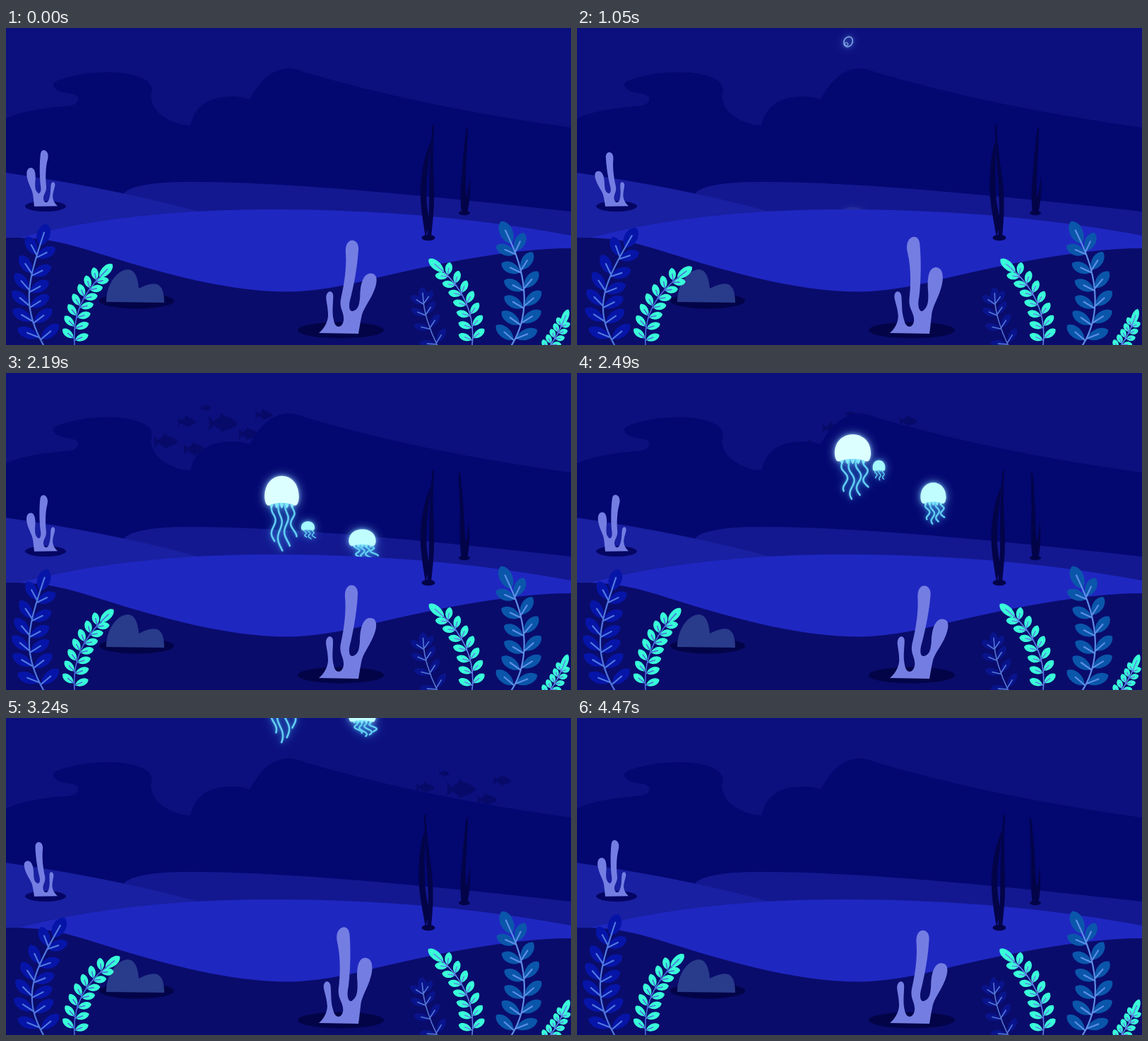
Animation, 800 px wide and 449 px high, one loop 4.5 s. Source, as an HTML page:

```html
<!DOCTYPE html>
<html lang="en">
<head>
<meta charset="utf-8">
<title>Sea floor</title>
<style>
html, body { margin: 0; width: 100%; height: 100%; overflow: hidden; background: #0c107e; }
svg { display: block; width: 100%; height: 100%; }
</style>
</head>
<body>
<svg id="sea" viewBox="0 0 800 449" preserveAspectRatio="none">
  <defs>
    <filter id="glow" x="-100%" y="-100%" width="300%" height="300%">
      <feGaussianBlur in="SourceGraphic" stdDeviation="7" result="wide"/>
      <feGaussianBlur in="SourceGraphic" stdDeviation="2.5" result="near"/>
      <feColorMatrix in="wide" values=".35 0 0 0 0  0 .6 0 0 0  0 0 1 0 0  0 0 0 .75 0" result="halo"/>
      <feColorMatrix in="near" values=".5 0 0 0 0  0 .75 0 0 0  0 0 1 0 0  0 0 0 .6 0" result="rim"/>
      <feMerge><feMergeNode in="halo"/><feMergeNode in="rim"/><feMergeNode in="SourceGraphic"/></feMerge>
    </filter>
  </defs>
  <rect width="800" height="449" fill="#0c107e"/>
  <g id="school" fill="#070a69"></g>
  <path fill="#030770" d="M0 128Q30 114 92 110Q104 107 102 98Q98 93 85 92Q66 88 67 79Q70 72 115 64Q175 58 200 75Q210 84 205 95Q206 125 250 137L261 138Q270 95 325 97Q338 98 345 101Q368 58 400 57Q410 57 424 63Q590 112 800 141V449H0Z"/>
  <path fill="#131890" d="M168 233Q185 218 260 218Q420 217 800 260V320H168Z"/>
  <path fill="#1920a1" d="M0 205Q158 228 276 261V320H0Z"/>
  <g id="swim"></g>
  <path fill="#1f27c1" d="M0 302Q160 257 375 257Q600 257 800 294V400H0Z"/>
  <path fill="#0a0c6b" d="M0 297C60 296 90 306 150 325C230 350 320 373.5 400 373.5Q450 373 520 355Q700 312 800 312V449H0Z"/>
  <g fill="#030448">
    <ellipse cx="649" cy="262" rx="8" ry="3.3"/>
    <ellipse cx="598" cy="297" rx="9.5" ry="4.3"/>
    <ellipse cx="56" cy="252.5" rx="29" ry="7.5" fill="#050663"/>
    <ellipse cx="185" cy="386.5" rx="53" ry="11"/>
    <ellipse cx="474" cy="428" rx="61" ry="11.5"/>
  </g>
  <path fill="#293b8b" d="M142 388C142 362 158 342 173 342Q186 343 188 369Q205 360 214 363Q224 367 224 389Z"/>
  <g id="flora"></g>
</svg>
<script>
const LOOP = 4500, TAU = Math.PI * 2;
const el = id => document.getElementById(id);
const mix = (a, b, k) => a + (b - a) * k;
const clamp = v => Math.max(0, Math.min(1, v));

function add(parent, tag, attrs) {
  const node = document.createElementNS('http://www.w3.org/2000/svg', tag);
  set(node, attrs);
  return parent.appendChild(node);
}
function set(node, attrs) {
  for (const k in attrs) node.setAttribute(k, attrs[k]);
}

// Smooth curve through [time, value] keys, linear outside them.
function track(keys, t) {
  const n = keys.length - 1;
  const slope = i => {
    const a = keys[Math.max(0, i - 1)], b = keys[Math.min(n, i + 1)];
    return (b[1] - a[1]) / (b[0] - a[0]);
  };
  if (t <= keys[0][0]) return keys[0][1] + slope(0) * (t - keys[0][0]);
  if (t >= keys[n][0]) return keys[n][1] + slope(n) * (t - keys[n][0]);
  let i = 0;
  while (t > keys[i + 1][0]) i++;
  const [t0, v0] = keys[i], [t1, v1] = keys[i + 1], h = t1 - t0, s = (t - t0) / h;
  const e = s * s * (3 - 2 * s);
  return mix(v0, v1, e) + h * s * (1 - s) * (slope(i) * (1 - s) - slope(i + 1) * s);
}

const wave = (t, phase) => Math.cos(TAU * t / 2250 - phase);
const slow = t => Math.cos(TAU * (t - 3500) / LOOP);

const warp = (d, move) => d.replace(/([\d.]+) ([\d.]+)/g, (m, x, y) =>
  move(+x, +y).map(v => v.toFixed(2)).join(' '));
const bend = (d, base, height, dx) => warp(d, (x, y) =>
  [x + dx * Math.pow(Math.max(0, base - y) / height, 2), y]);

// ---- fish ----
const FISH = 'M20 0C14 -6 8 -9 2 -9L-3 -14L-5 -8Q-10 -5 -13 -2L-20 -9Q-18 0 -19 11L-12 3Q-7 8 -2 9L-3 13L4 9Q15 7 20 0Z';
const fish = [[283, 49, 15], [256, 69, 26], [307, 71, 42], [365, 59, 25], [343, 86, 28], [226, 97, 34], [267, 108, 32]]
  .map(([x, y, len]) => ({ x, y, k: len / 40, node: add(el('school'), 'path', { d: FISH }) }));
const schoolX = [[1770, -148], [2190, 0], [2790, 203], [3780, 494]];
const schoolY = [[1770, 0], [2190, 0], [2790, 19], [3780, 41]];

function drawFish(t) {
  const dx = track(schoolX, t), dy = t < 1770 ? 0 : track(schoolY, t);
  for (const f of fish)
    set(f.node, { transform: `translate(${f.x + dx} ${f.y + dy}) rotate(2) scale(${f.k})` });
}

// ---- jellyfish and bubble ----
// half width, half height and tentacle length run from tall to wide
const jellies = [
  { x: 390.5, y: [[1050, 274], [1770, 231], [2190, 168], [2790, 43], [3380, -80]], born: 1010, fade: 500,
    wide: 1770, a: [24, 28.5], b: [22.5, 16], len: [70, 32], arms: 4, line: 2.6, tone: '#dcffff' },
  { x: 504.5, y: [[1950, 276], [2190, 234], [2790, 104], [3500, -70]], born: 1950, fade: 150,
    wide: 2190, a: [17.5, 19.2], b: [17.5, 12.5], len: [36, 22], arms: 4, line: 2.4, tone: '#c0fdff' },
  { x: 427.5, y: [[2000, 268], [2190, 217], [2790, 47], [3300, -90]], born: 2000, fade: 120,
    wide: 2190, a: [8.5, 9.6], b: [8.5, 6.8], len: [15, 13], arms: 3, line: 1.5, tone: '#a4f8ff' }
].map(j => {
  const g = add(el('swim'), 'g', { filter: 'url(#glow)' });
  return Object.assign(j, {
    g,
    arm: add(g, 'path', { fill: 'none', stroke: '#62cdf2', 'stroke-width': j.line, 'stroke-linecap': 'round' }),
    frill: add(g, 'path', { fill: '#80e6fa' }),
    cap: add(g, 'path', { fill: j.tone })
  });
});

function drawJelly(j, t) {
  const y = track(j.y, t), show = t > j.born && y > -110;
  set(j.g, { display: show ? 'inline' : 'none' });
  if (!show) return;
  const p = (1 + Math.cos(TAU * (t - j.wide) / 1020)) / 2;
  const a = mix(...j.a, p), b = mix(...j.b, p), len = mix(...j.len, p), size = j.a[0] / 24;
  let arms = '', frill = `M${-a * .75} ${b * .6}`;
  for (let i = 0; i < j.arms; i++) {
    const x0 = a * (i / (j.arms - 1) - .5) * 1.15;
    const reach = len * [.8, 1, .9, .7][i];
    for (let n = 0; n <= 16; n++) {
      const s = n / 16;
      const x = x0 + s * (3 + 7 * p) * size + mix(3.4, 5.5, p) * size * Math.sin(s * 8.5 + i * .5 - t / 260) * Math.min(1, s * 3);
      arms += `${n ? 'L' : 'M'}${x.toFixed(2)} ${(b * .75 + s * reach).toFixed(2)}`;
    }
  }
  for (let i = 0; i < 5; i++)
    frill += `q${a * .15} ${b * .95} ${a * .3} 0`;
  set(j.arm, { d: arms });
  set(j.frill, { d: frill + 'Z' });
  set(j.cap, { d: `M${-a} ${b * .4}C${-a * 1.02} ${-b * .5} ${-a * .55} ${-b} 0 ${-b}C${a * .55} ${-b} ${a * 1.02} ${-b * .5} ${a} ${b * .4}` +
    `Q${a * .94} ${b * 1.1} ${a * .6} ${b * .82}Q0 ${b * .62} ${-a * .6} ${b * .82}Q${-a * .94} ${b * 1.1} ${-a} ${b * .4}Z` });
  set(j.g, { transform: `translate(${j.x} ${y})`, opacity: clamp((t - j.born) / j.fade) });
}

const bubble = add(el('swim'), 'g', { filter: 'url(#glow)', fill: 'none', stroke: '#7d9fe0', 'stroke-width': 1.7 });
add(bubble, 'ellipse', { rx: 6, ry: 7.3, transform: 'rotate(28)' });
add(bubble, 'circle', { cx: -2.6, cy: 3.2, r: 2.2, 'stroke-width': 1.2 });

function drawBubble(t) {
  const y = 20 - (t - 1050) * .52;
  set(bubble, {
    display: t > 560 && y > -30 ? 'inline' : 'none',
    transform: `translate(${384 + 4 * Math.sin((t - 1050) / 90)} ${y})`
  });
}

// ---- dark seaweed ----
const weedFill = { fill: '#030448' };
const tallWeed = add(el('flora'), 'path', weedFill), thinWeed = add(el('flora'), 'path', weedFill);
const TALL = 'M594 296C588 262 583 235 587 205C589 182 594 168 597 160C597 180 594 200 594 225C594 250 597 260 600 275Z' +
  'M596 296C600 262 598 235 598 215C597 180 597 160 598 137L600 137C600 165 601 180 604 215C607 250 604 275 602 296Z';
const THIN = 'M645 262C641 235 645 205 645 185C646 165 646 150 647 141L649 141C650 165 650 185 650 200C650 220 650 235 652 240C654 228 655 220 656 210C658 230 656 250 653 262Z';

function drawWeeds(t) {
  set(tallWeed, { d: bend(TALL, 296, 158, 6.3 * wave(t, 0)) });
  const dx = t < 1050 ? 5 - 2 * Math.sin(Math.PI * t / 1050) : -.5 - 5.8 * wave(t, -.25);
  set(thinWeed, { d: bend(THIN, 262, 121, dx) });
}

// ---- coral ----
const CORAL = 'M443 432C450 426 455 418 456 408C456 395 453 388 453 381C454 371 463 371 463 380C463 392 461 402 464 414' +
  'C466 426 476 426 478 414C479 402 471 398 474 383C478 365 482 340 480 318C478 295 499 296 498 313C497 335 493 360 488 381' +
  'C484 394 486 402 491 401C499 398 500 392 501 380C501 365 504 349 514 347C526 346 526 358 521 371C515 387 505 397 503 410C501 420 500 428 499 433Z';
const bigCoral = add(el('flora'), 'path', { fill: '#747ee2' });
const smallCoral = add(el('flora'), 'path', { fill: '#747ee2', transform: 'translate(333.5 2) scale(-.588 .579)' });

const coral = k => warp(CORAL, (x, y) => {
  const h = Math.max(0, 432 - y);
  return [x - 15 * k * Math.pow(h / 131, 1.5), y - (x > 495 ? 8 * k * clamp(h / 85) : 0)];
});
function drawCoral(t) {
  const c = .7 * wave(t, .6);
  set(bigCoral, { d: coral(.5 - c) });
  set(smallCoral, { d: coral(.5 + c) });
}

// ---- leafy plants ----
// stem is a cubic curve whose upper half follows the sway; lean is the side with flatter leaves
const plants = [
  { stem: [53, 449, 24, 398, 33, 366, 60, 306], pairs: 6, len: 33, tip: 28, w: 7.6, lean: 1, leaf: '#0615a8', line: '#4f78e0', sway: t => -11 * wave(t, .2) },
  { stem: [97, 449, 94, 405, 112, 376, 141, 351], pairs: 7, len: 21, tip: 22, w: 5, lean: 1, leaf: '#38ffd9', line: '#4a6fdc', sway: t => -9 * wave(t, .87) },
  { stem: [612, 452, 598, 425, 592, 400, 591, 386], pairs: 4, len: 24, tip: 19, w: 5, lean: -1, leaf: '#09148c', line: '#5577d6', sway: t => -.8 * slow(t) },
  { stem: [660, 449, 665, 405, 646, 368, 617, 343], pairs: 7, len: 21, tip: 24, w: 5, lean: -1, leaf: '#38ffd9', line: '#5c86e6', sway: t => -.8 * slow(t) },
  { stem: [716, 449, 742, 408, 738, 354, 714, 302], pairs: 6, len: 33, tip: 31, w: 7.6, lean: -1, leaf: '#0a56ab', line: '#5c8ee6', sway: t => slow(t) },
  { stem: [764, 458, 774, 446, 782, 433, 788, 418], pairs: 5, len: 15, tip: 21, w: 4, lean: 1, leaf: '#38ffd9', line: '#5c86e6', sway: t => slow(t) }
].map(p => Object.assign(p, {
  leaves: add(el('flora'), 'path', { fill: p.leaf }),
  veins: add(el('flora'), 'path', { fill: 'none', stroke: p.line, 'stroke-width': p.len > 25 ? 2.2 : 1.6, 'stroke-linecap': 'round' })
}));

function drawPlant(p, t) {
  const d = p.sway(t), [x0, y0, x1, y1, x2m, y2, x3m, y3] = p.stem;
  const x2 = x2m + .36 * d, x3 = x3m + d, y3b = y3 + .15 * d;
  const point = (a, b, c, e, s) => {
    const r = 1 - s;
    return r * r * r * a + 3 * r * r * s * b + 3 * r * s * s * c + s * s * s * e;
  };
  const at = s => [point(x0, x1, x2, x3, s), point(y0, y1, y2, y3b, s)];
  // angle from straight up
  const heading = s => {
    const [ax, ay] = at(s - .01), [bx, by] = at(s + .01);
    return Math.atan2(bx - ax, ay - by);
  };
  let leaves = '', veins = `M${x0} ${y0}C${x1} ${y1} ${x2} ${y2} ${x3} ${y3b}`;
  const leaf = (s, angle, len, w, gap) => {
    const [x, y] = at(s), c = Math.sin(angle), n = -Math.cos(angle);
    const to = (u, v) => `${(x + u * c - v * n).toFixed(2)} ${(y + u * n + v * c).toFixed(2)}`;
    const l = gap + len * .22, r = len * .86;
    leaves += `M${to(gap, 0)}C${to(l, -w * 1.35)} ${to(r, -w * 1.35)} ${to(len, 0)}C${to(r, w * 1.35)} ${to(l, w * 1.35)} ${to(gap, 0)}Z`;
    veins += `M${to(0, 0)}L${to(len * .55, 0)}`;
  };
  for (let i = 0; i < p.pairs; i++) {
    const s = .07 + .83 * i / (p.pairs - 1);
    const len = p.len * (1.03 - .12 * s), base = .7 * heading(s);
    leaf(s, base - p.lean * (.88 - .2 * s), len, p.w, 1.5);
    leaf(s - .02, base + p.lean * (1.22 - .35 * s), len, p.w, 1.5);
  }
  leaf(1, heading(1), p.tip, p.w * 1.2, -4);
  set(p.leaves, { d: leaves });
  set(p.veins, { d: veins });
}

function draw(t) {
  drawFish(t);
  drawBubble(t);
  jellies.forEach(j => drawJelly(j, t));
  drawWeeds(t);
  drawCoral(t);
  plants.forEach(p => drawPlant(p, t));
}

const start = performance.now();
function frame() {
  draw((performance.now() - start) % LOOP);
  requestAnimationFrame(frame);
}
frame();
</script>
</body>
</html>
```
